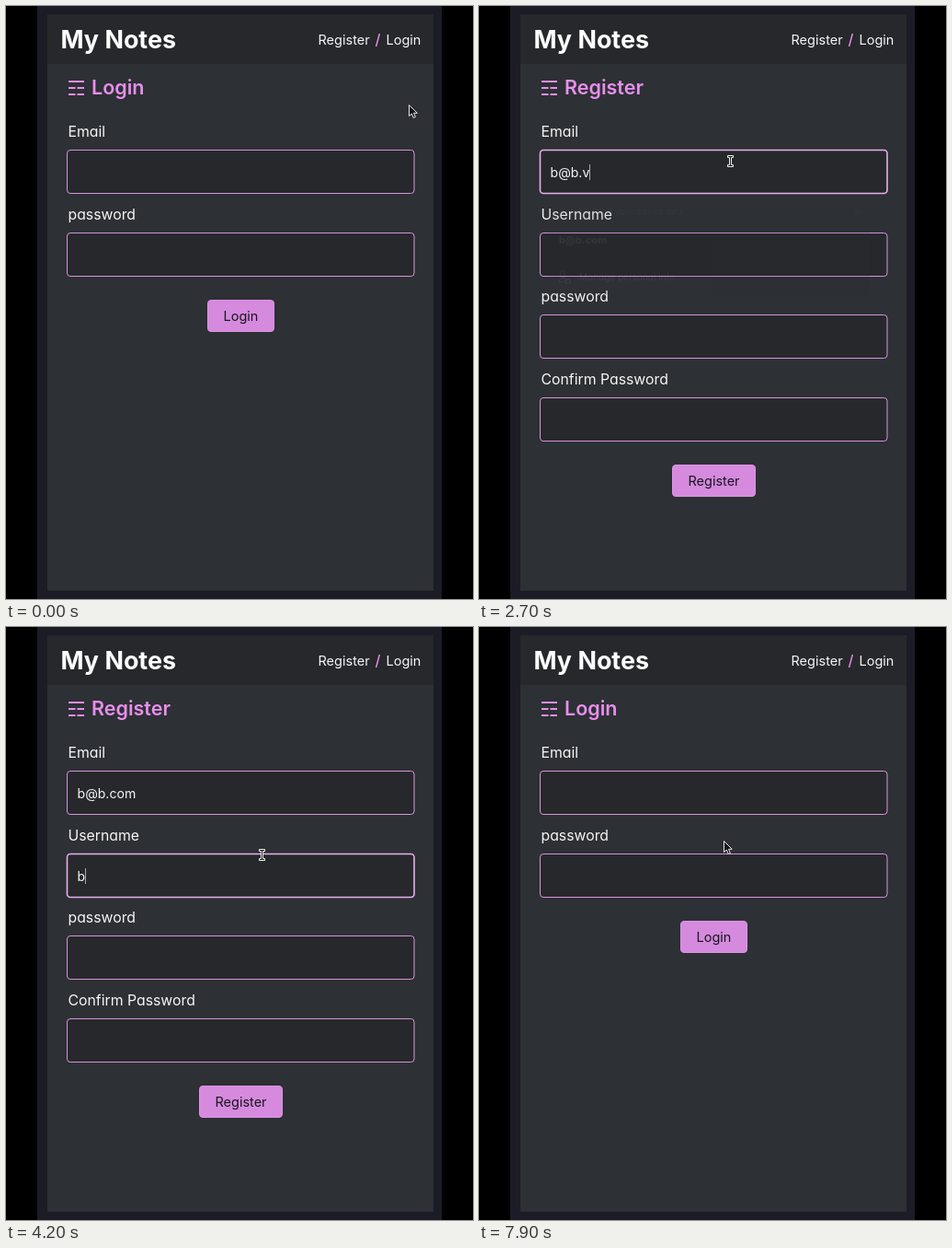
An HTML page that plays this animation: 508x644 px, repeating every 8000 ms.

```html
<!DOCTYPE html>
<html lang="en">
<head>
<meta charset="utf-8">
<title>My Notes</title>
<style>
  html, body { margin: 0; width: 100%; height: 100%; overflow: hidden; background: #000; }
  svg { display: block; width: 508px; height: 644px; }
  text { font-family: Inter, Lato, sans-serif; font-feature-settings: "cv11"; fill: #f6f6f7; white-space: pre; }
  .brand { font-size: 26.9px; font-weight: 700; fill: #fff; }
  .nav { font-size: 14.5px; }
  .slash { font-size: 16px; font-weight: 500; fill: #e58dea; }
  .title { font-size: 21.5px; font-weight: 600; fill: #e88fed; }
  .label { font-size: 15.8px; }
  .value { font-size: 14.1px; }
  .box { fill: #27282c; stroke: #d794dc; }
  .focus .box { stroke: #e9aeee; stroke-width: 1.6; }
  .caret { fill: #a9a9ad; visibility: hidden; }
  .focus .caret { visibility: visible; }
  .dots { stroke: #f6f6f7; stroke-width: 3.8; stroke-linecap: round; stroke-dasharray: 0 4.8; }
  .eye { fill: none; stroke: #0c0c0f; stroke-width: 1.6; stroke-linecap: round; }
  .button rect { fill: #d58ade; stroke: #dc93e5; }
  .button text { font-size: 14.5px; fill: #17171c; text-anchor: middle; }
  .popup text { font-size: 10px; fill: #a8a8ac; }
  .popup .hint { opacity: .5; }
  .popup .bold { font-size: 11px; font-weight: 700; }
  .popup path { fill: none; stroke: #a8a8ac; }
</style>
</head>
<body>
<svg viewBox="0 0 508 644">
  <rect width="508" height="644" fill="#000"/>
  <rect x="34" width="440" height="644" fill="#1c1c26"/>
  <rect x="45" y="9" width="420" height="626" fill="#2d3034"/>
  <rect x="45" y="9" width="420" height="54" fill="#27282b"/>
  <text class="brand" x="59.5" y="45.5">My Notes</text>
  <text class="nav" x="339.5" y="41.5">Register</text>
  <text class="slash" x="401.5" y="42">/</text>
  <text class="nav" x="413.5" y="41.5">Login</text>
  <path d="M68 82H85M68 89H75.5M77.5 89H85M68 96H75.5M77.5 96H85" stroke="#e88fed" stroke-width="2.2"/>
  <text class="title" id="title" x="93" y="96"></text>
  <g id="fields"></g>
  <g class="button" id="button">
    <rect height="34" rx="3.5"/>
    <text x="255.5"></text>
  </g>
  <g class="popup" id="popup">
    <rect x="75" y="208" width="350" height="106" rx="5" fill="#2f3135"/>
    <text class="hint" x="87" y="227">Autofill from your saved info</text>
    <path class="hint" d="M409 220l6 6m0-6l-6 6"/>
    <text class="bold" x="87" y="258">b@b.com</text>
    <path d="M87 300c0-6 8-6 9-2M87 300h5M94 297h5v4h-5zM89 291a2.4 2.4 0 1 0 4 0a2.4 2.4 0 1 0-4 0"/>
    <text x="109" y="298">Manage personal info</text>
  </g>
  <g id="cursor">
    <path id="arrow" d="M0 0V12L2.8 9.5L4.8 14L6.9 13L5 8.8H8.8Z" fill="#16161a" stroke="#e4e4e6"/>
    <path id="beam" d="M-3-6H3V-4H1V4H3V6H-3V4H-1V-4H-3Z" fill="#202024" stroke="#f0f0f2"/>
    <path id="hand" d="M-1.5 0Q0-1.5 1.5 0V5L8 7V12L6 17H-1L-5 10.5Q-5 8-1.5 10Z" fill="#16161a" stroke="#e4e4e6"/>
  </g>
</svg>
<script>
const LOOP = 8000, STEP = 100, PITCH = 89.6;
const $ = id => document.getElementById(id);
const clamp = u => Math.min(1, Math.max(0, u));
const show = (el, on) => el.setAttribute('visibility', on ? 'visible' : 'hidden');

// the first letter appears at `from`, one more every `gap` ms
const type = (text, t, from, gap) => text.slice(0, Math.max(0, Math.floor((t - from) / gap) + 1));
const email = t => t < 2800 ? type('b@b.v', t, 1800, 200) : 'b@b.' + type('com', t, 2900, 100);
const secret = (from, gap) => t => type('••••••', t, from, gap);
const none = () => '';

const login = {
  title: 'Login', width: 72,
  fields: [{ label: 'Email', text: none }, { label: 'password', text: none }]
};
const register = {
  title: 'Register', width: 90,
  fields: [
    { label: 'Email', text: email, focus: [1600, 3500] },
    { label: 'Username', text: t => type('b', t, 4200, 100), focus: [4000, 4600] },
    { label: 'password', text: secret(4800, 150), focus: [4600, 6000], hidden: true },
    { label: 'Confirm Password', text: secret(6200, 100), focus: [6000, 7200], hidden: true }
  ]
};
const buttonTop = page => Math.round(141 + PITCH * page.fields.length) - .5;

// pointer moves: leave, arrive, x, y
const moves = [
  [800, 1300, 368, 36], [1300, 1500, 267, 175], [1500, 1600, 273, 168],
  [3300, 3800, 280, 273], [4000, 4200, 278, 247], [4200, 4600, 195, 359],
  [5500, 5700, 149, 420], [5700, 5900, 150, 450],
  [6700, 6900, 260, 546], [6900, 7100, 258, 518], [7600, 7900, 266, 232]
];

function pointAt(t) {
  let x = 438, y = 107;
  for (const [leave, arrive, toX, toY] of moves) {
    const u = clamp((t - leave) / (arrive - leave)), e = u * u * (3 - 2 * u);
    x += (toX - x) * e;
    y += (toY - y) * e;
  }
  return [Math.round(x), Math.round(y)];
}

const slots = register.fields.map((_, i) => {
  const g = document.createElementNS('http://www.w3.org/2000/svg', 'g');
  g.setAttribute('transform', `translate(0 ${Math.round(i * PITCH)})`);
  g.innerHTML = `
    <text class="label" x="67.5" y="141.5"></text>
    <rect class="box" x="66.5" y="156.5" width="377.5" height="47" rx="3.5"/>
    <text class="value" x="77.5" y="185.5"></text>
    <path class="dots"/>
    <path class="eye" d="M413 182Q421 171 429 182M418 182a3.2 3.2 0 1 0 6.4 0a3.2 3.2 0 1 0-6.4 0"/>
    <rect class="caret" y="172" width="1" height="17"/>`;
  $('fields').append(g);
  const part = name => g.querySelector('.' + name);
  return { g, label: part('label'), value: part('value'), dots: part('dots'), eye: part('eye'), caret: part('caret') };
});

function drawField(slot, field, t) {
  slot.g.style.display = field ? '' : 'none';
  if (!field) return;
  const { label, text, focus = [0, 0], hidden } = field;
  const value = text(t), n = hidden ? value.length : 0;
  const focused = t >= focus[0] && t < focus[1];
  slot.g.classList.toggle('focus', focused);
  slot.label.textContent = label;
  slot.value.textContent = hidden ? '' : value;
  slot.dots.setAttribute('d', n ? `M80 180.5h${(n - 1) * 4.8 + .1}` : '');
  show(slot.eye, focused && n);
  const end = hidden ? n * 4.8 : slot.value.getComputedTextLength();
  slot.caret.setAttribute('x', Math.floor(77.5 + end));
}

function drawButton(page) {
  const [box, text] = $('button').children, top = buttonTop(page);
  box.setAttribute('x', 255.5 - page.width / 2);
  box.setAttribute('y', top);
  box.setAttribute('width', page.width);
  text.setAttribute('y', top + 22.5);
  text.textContent = page.title;
}

function drawCursor(t, page) {
  const [x, y] = pointAt(t);
  const inside = (left, top, w, h) => x >= left && x <= left + w && y >= top && y <= top + h;
  const overInput = page.fields.some((_, i) => inside(66, 156 + i * PITCH, 378, 48));
  const overLink = inside(339, 27, 112, 18) || inside(255 - page.width / 2, buttonTop(page), page.width, 35);
  const kind = overInput ? 'beam' : overLink ? 'hand' : 'arrow';
  for (const id of ['arrow', 'beam', 'hand']) show($(id), id === kind);
  $('cursor').setAttribute('transform', `translate(${x + .5} ${y + .5})`);
}

function draw(t) {
  const page = t >= 1300 && t < 7600 ? register : login;
  $('title').textContent = page.title;
  slots.forEach((slot, i) => drawField(slot, page.fields[i], t));
  drawButton(page);
  $('popup').setAttribute('opacity', t < 1800 ? 0 : clamp((2725 - t) / 250));
  drawCursor(t, page);
}

const start = performance.now();
function tick() {
  const t = (performance.now() - start) % LOOP;
  draw(Math.floor(t / STEP) * STEP);
  requestAnimationFrame(tick);
}
tick();
</script>
</body>
</html>
```
